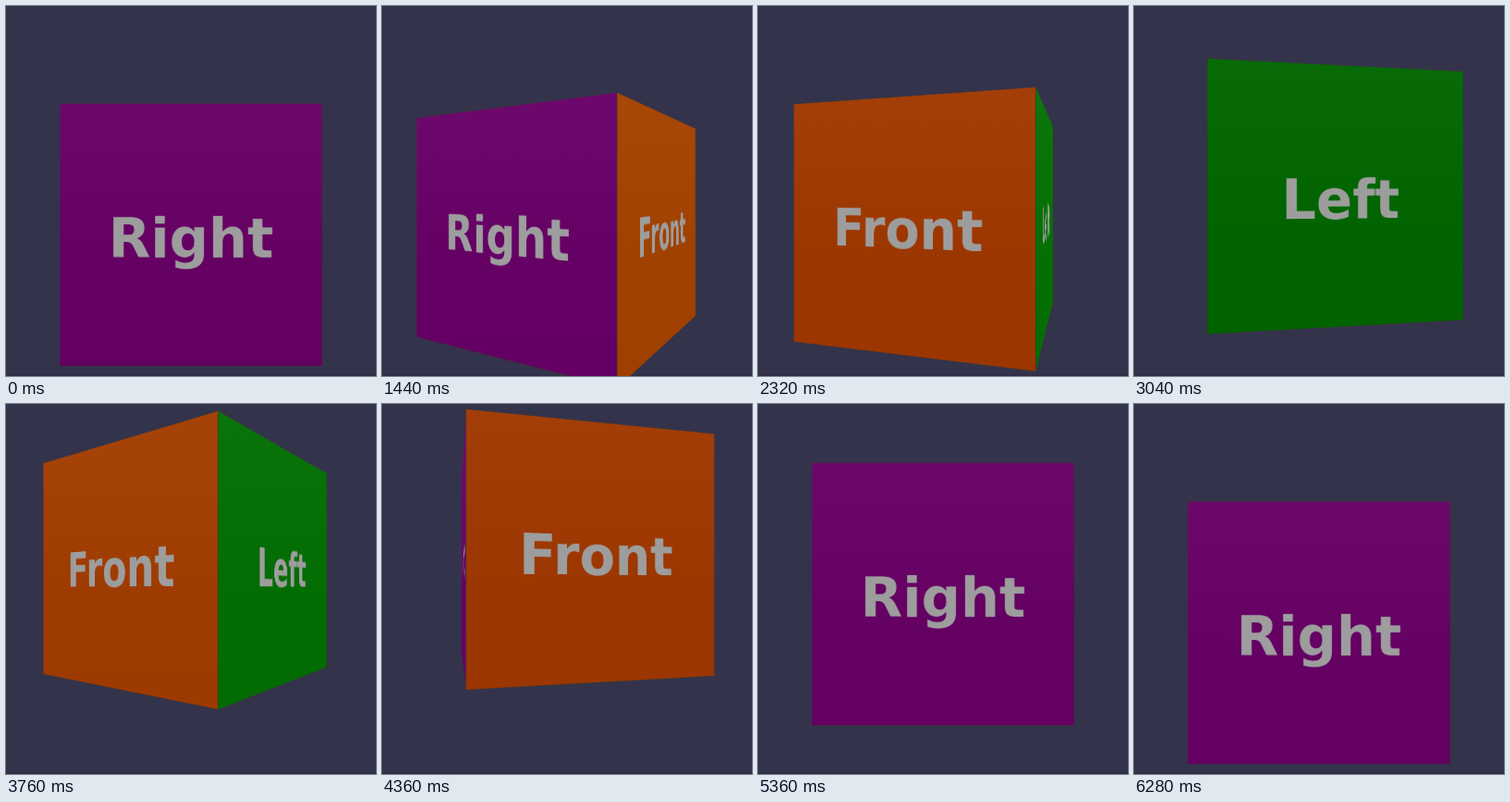
Animation of 400x400 px, one loop 6320 ms. Source, as an HTML page with a canvas:

```html
<!DOCTYPE html>
<html lang="en">
<head>
<meta charset="utf-8">
<title>Turning cube</title>
<style>
html, body { margin: 0; width: 100%; height: 100%; overflow: hidden; background: #33334c; }
canvas { display: block; width: 400px; height: 400px; }
</style>
</head>
<body>
<canvas id="stage" width="400" height="400"></canvas>
<script>
const ctx = document.getElementById('stage').getContext('2d');
ctx.imageSmoothingQuality = 'high';

const LOOP = 6320;
const MID = 200;
const FOCAL = MID / Math.tan(0.4); // field of view of 0.8 rad
const CAMERA = 6.5 / 3;            // distance, in cube edges
const RADIUS = Math.SQRT1_2;
const TEX = 512;

// rgb is the face seen head-on, glow is what a tilted face gains
const faces = [
  { label: 'Right', rgb: [99, 0, 98], glow: [2, 0, 4] },
  { label: 'Front', rgb: [155, 53, 0], glow: [6, 13, 0] },
  { label: 'Left', rgb: [0, 99, 0], glow: [3, 13, 3] }
];
faces.forEach(face => { face.texture = makeLabel(face.label); });

function makeLabel(text) {
  const canvas = document.createElement('canvas');
  canvas.width = canvas.height = TEX;
  const pen = canvas.getContext('2d');
  pen.font = 'bold 80pt "DejaVu Sans", sans-serif';
  pen.textAlign = 'center';
  pen.fillStyle = '#9d9d9d';
  pen.fillText(text, TEX / 2, 300);
  return canvas;
}

// 0 -> 1 -> 0, each way lasting `half` ms
function thereAndBack(t, start, half) {
  return Math.max(0, 1 - Math.abs((t - start) / half - 1));
}

function corner(angle) {
  const scale = FOCAL / (CAMERA - RADIUS * Math.cos(angle));
  return { x: MID + RADIUS * Math.sin(angle) * scale, scale };
}

function shade(face, angle, lift) {
  const tilt = Math.sin(angle) ** 2;
  const parts = face.rgb.map((v, i) => Math.round(v + face.glow[i] * tilt + lift));
  return `rgb(${parts.join(',')})`;
}

function drawFace(face, angle, drop) {
  const sin = Math.sin(angle), cos = Math.cos(angle);
  const facing = CAMERA * cos - 0.5;
  if (facing <= 0) return;

  const left = corner(angle - Math.PI / 4);
  const right = corner(angle + Math.PI / 4);
  const yAt = (c, v) => MID + (drop + v) * c.scale;

  ctx.beginPath();
  ctx.moveTo(left.x, yAt(left, -0.5));
  ctx.lineTo(right.x, yAt(right, -0.5));
  ctx.lineTo(right.x, yAt(right, 0.5));
  ctx.lineTo(left.x, yAt(left, 0.5));
  ctx.closePath();
  const fill = ctx.createLinearGradient(0, yAt(left, -0.5), 0, yAt(left, 0.5));
  fill.addColorStop(0, shade(face, angle, 8));
  fill.addColorStop(0.6, shade(face, angle, 1));
  fill.addColorStop(1, shade(face, angle, 0));
  ctx.fillStyle = fill;
  ctx.fill();
  ctx.strokeStyle = 'rgba(60, 56, 50, 0.7)';
  ctx.lineWidth = 0.6;
  ctx.stroke();

  // where a screen column meets the face: u across it, depth from the camera
  const hit = x => {
    const ray = (x - MID) / FOCAL;
    const depth = facing / (cos - ray * sin);
    return { depth, u: depth * ray * cos - (CAMERA - depth) * sin + 0.5 };
  };
  for (let x = Math.ceil(left.x); x < Math.floor(right.x); x++) {
    const u0 = hit(x).u, u1 = hit(x + 1).u;
    const scale = FOCAL / hit(x + 0.5).depth;
    ctx.drawImage(face.texture, u0 * TEX, 0, (u1 - u0) * TEX, TEX,
      x, MID + (drop - 0.5) * scale, 1, scale);
  }
}

function draw(t) {
  const turn = Math.PI * thereAndBack(t, 1082, 2075);
  const drop = (1 - 2 * thereAndBack(t, 2120, 2080)) / 6;
  ctx.fillStyle = '#33334c';
  ctx.fillRect(0, 0, 400, 400);
  ctx.fillStyle = '#2f2e44';
  ctx.fillRect(0, 398.5, 400, 1.5);
  faces.forEach((face, i) => drawFace(face, i * Math.PI / 2 - turn, drop));
}

const begin = performance.now();
function tick() {
  draw((performance.now() - begin) % LOOP);
  requestAnimationFrame(tick);
}
tick();
</script>
</body>
</html>
```
